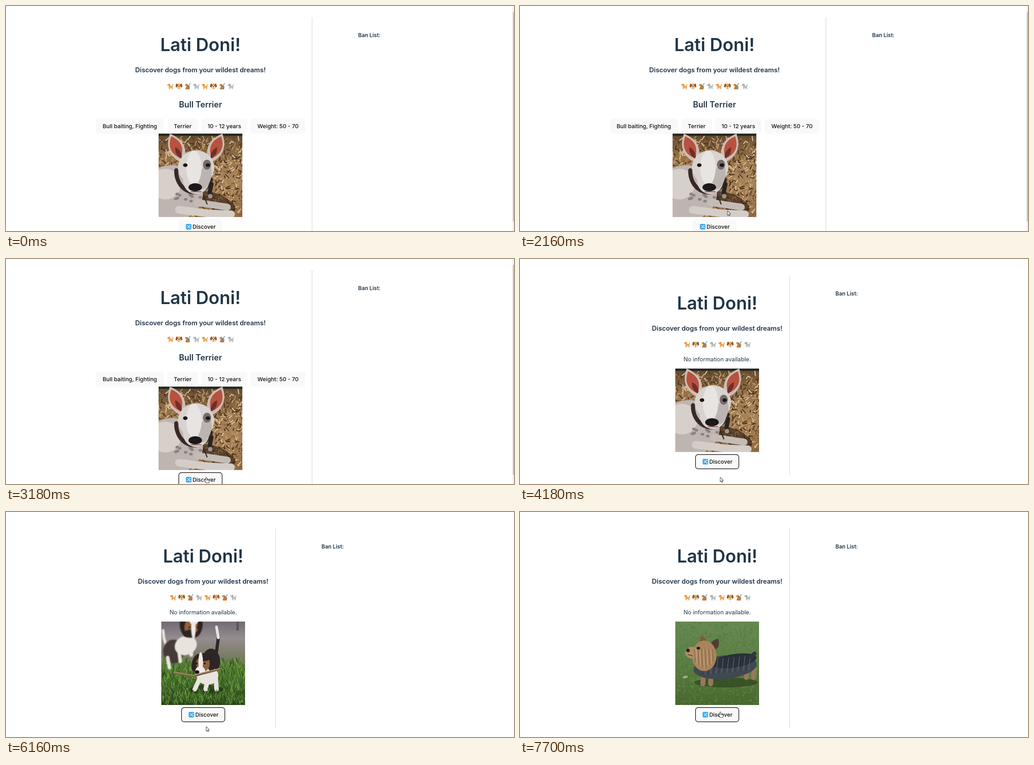
Animation of 1122 by 499 pixels, one loop 8 s. Source, as an HTML page with a canvas:

```html
<!DOCTYPE html>
<html lang="en">
<head>
<meta charset="utf-8">
<title>Dog finder</title>
<style>
  html, body { margin: 0; width: 100%; height: 100%; overflow: hidden; background: #fff; }
  canvas, .page { position: absolute; left: 0; top: 0; width: 1122px; height: 499px; overflow: hidden; }
  .page span {
    position: absolute; transform: translate(-50%, -50%); white-space: nowrap;
    line-height: 1.2; font-family: Inter, "Open Sans", sans-serif;
  }
</style>
</head>
<body>
<canvas id="art" width="1122" height="499"></canvas>
<div class="page" id="found"></div>
<div class="page" id="empty"></div>
<canvas id="pointer" width="1122" height="499"></canvas>
<script>
const LOOP = 8000, SWAP = 4180, SIZE = 185;
const INK = '#213547', BLACK = '#111';
const byId = id => document.getElementById(id);
const art = byId('art').getContext('2d');
const overlay = byId('pointer').getContext('2d');
const found = byId('found'), empty = byId('empty');

// ---------- text ----------
function label(page, str, x, y, size, weight, color = INK) {
  const s = document.createElement('span');
  s.textContent = str;
  s.style.cssText = `left:${x}px;top:${y}px;font-size:${size}px;font-weight:${weight};color:${color}`;
  page.append(s);
}
function shared(page, x, y, banX, buttonY) {
  label(page, 'Lati Doni!', x, y, 39.2, 600);
  label(page, 'Discover dogs from your wildest dreams!', x, y + 57, 14.55, 600);
  label(page, 'Ban List:', banX, y - 21.5, 11.9, 600);
  label(page, 'Discover', x + 8, buttonY, 12.2, 500, BLACK);
}
const pills = [
  { str: 'Bull baiting, Fighting', x: 198, w: 151 },
  { str: 'Terrier', x: 356.5, w: 67.5 },
  { str: '10 - 12 years', x: 431, w: 102.5 },
  { str: 'Weight: 50 - 70', x: 540.5, w: 120.5 }
];
shared(found, 429.5, 86, 802.5, 490);
label(found, 'Bull Terrier', 429.5, 219, 18, 600);
for (const p of pills) label(found, p.str, p.x + p.w / 2, 267, 12.35, 450, BLACK);
shared(empty, 435.5, 98, 721.5, 449.5);
label(empty, 'No information available.', 435.5, 222.5, 12.7, 400);

// ---------- drawing helpers ----------
function rng(seed) {
  return () => (seed = (seed * 16807) % 2147483647) / 2147483647;
}
function oval(c, fill, x, y, rx, ry = rx, turn = 0) {
  c.fillStyle = fill;
  c.beginPath();
  c.ellipse(x, y, rx, ry, turn, 0, 7);
  c.fill();
}
function line(c, color, width, ...p) {
  c.strokeStyle = color;
  c.lineWidth = width;
  c.lineCap = c.lineJoin = 'round';
  c.beginPath();
  for (let i = 0; i < p.length; i += 2) c.lineTo(p[i], p[i + 1]);
  c.stroke();
}
// pointed lens from one end to the other
function leaf(c, fill, x0, y0, x1, y1, fat) {
  const mx = (x0 + x1) / 2, my = (y0 + y1) / 2, k = fat / Math.hypot(x1 - x0, y1 - y0);
  const nx = (y0 - y1) * k, ny = (x1 - x0) * k;
  c.fillStyle = fill;
  c.beginPath();
  c.moveTo(x0, y0);
  c.quadraticCurveTo(mx + nx, my + ny, x1, y1);
  c.quadraticCurveTo(mx - nx, my - ny, x0, y0);
  c.fill();
}
function box(c, x, y, w, h, r, fill) {
  c.beginPath();
  c.roundRect(x, y, w, h, r);
  c.fillStyle = fill;
  c.fill();
}
function at(c, x, y, draw, sx = 1, sy = sx) {
  c.save();
  c.translate(x, y);
  c.scale(sx, sy);
  draw(c);
  c.restore();
}
function backdrop(c, ...colors) {
  const g = c.createLinearGradient(0, 0, 0, SIZE);
  colors.forEach((color, i) => g.addColorStop(i / (colors.length - 1), color));
  c.fillStyle = g;
  c.fillRect(0, 0, SIZE, SIZE);
}
function strokes(c, count, top, colors, length, width, lean) {
  const rand = rng(count);
  for (let i = 0; i < count; i++) {
    const x = rand() * SIZE, y = top + rand() * (SIZE - top);
    const a = -Math.PI / 2 + (rand() - .5) * lean, l = length * (.5 + rand());
    line(c, colors[i % colors.length], width, x, y, x + Math.cos(a) * l, y + Math.sin(a) * l);
  }
}
function picture(draw) {
  const cv = document.createElement('canvas');
  cv.width = cv.height = SIZE;
  draw(cv.getContext('2d'));
  return cv;
}
const sides = [-1, 1];

// ---------- pictures ----------
const terrier = picture(c => {
  backdrop(c, '#5d472f', '#8f6d45', '#a8845a', '#a17b50', '#8f6a43');
  strokes(c, 800, 12, ['#c9a477', '#e0c59c', '#84603a', '#543b25', '#b58d5f', '#493220'], 7, 2.2, 3.1);
  box(c, 0, 0, SIZE, 5, 0, '#252821');
  oval(c, 'rgba(45,28,18,.6)', 128, 152, 45, 18, .4);
  oval(c, '#beb5b0', 30, 132, 68, 62);
  oval(c, '#d6cfca', 15, 112, 34, 34);
  line(c, '#c4bbb5', 15, 85, 153, 152, 163);
  line(c, '#d4ccc7', 17, 45, 169, 110, 177, 160, 179);
  const rand = rng(12);
  for (let i = 0; i < 10; i++) oval(c, '#8b8382', 38 + rand() * 56, 132 + rand() * 22, 4, 3);
  c.lineWidth = 9;
  c.strokeStyle = '#372a24';
  c.beginPath();
  c.ellipse(79, 84, 40, 46, 0, .4, 3.2);
  c.stroke();
  for (const s of sides) {
    leaf(c, '#cdbdb5', 83 + s * 58, 0, 83 + s * 28, 66, 34);
    leaf(c, '#b8523f', 83 + s * 55, 6, 83 + s * 34, 55, 25);
    leaf(c, '#6f2f27', 83 + s * 46, 30, 83 + s * 32, 56, 10);
  }
  oval(c, '#d8d3d0', 83, 75, 40, 38);
  oval(c, '#d8d3d0', 83, 104, 29, 30);
  oval(c, '#bcb4b0', 103, 96, 13, 28, .25);
  oval(c, '#e8e4e1', 78, 76, 17, 38);
  oval(c, '#756c69', 107, 69, 9, 11);
  for (const s of sides) oval(c, '#1c1716', 84 + s * 25, 70, 5, 4);
  oval(c, '#1d191a', 81, 119, 15, 9);
  line(c, '#8a5752', 2, 72, 129, 94, 129);
  line(c, '#2b2321', 9, 117, 112, 113, 130);
  oval(c, '#9c9490', 114, 139, 5);
  line(c, '#3a302b', 2.5, 101, 140, 107, 156);
});

function puppyHead(c) {
  for (const s of sides) oval(c, '#2d2523', s * 15, -2, 9, 20, -s * .3);
  oval(c, '#94603d', 0, 0, 15, 18);
  oval(c, '#2d2523', 2, -14, 15, 9);
  oval(c, '#f0ebe7', -5, -3, 5, 22);
  oval(c, '#f0ebe7', -6, 18, 11, 12);
  oval(c, '#191617', -13, 19, 5, 4);
  for (const s of sides) oval(c, '#191617', -5 + s * 9, 0, 2);
}
const puppies = picture(c => {
  const coat = '#2c2626', white = '#e9e3de';
  backdrop(c, '#716a70', '#958c91', '#7d7d68', '#4e792d', '#3c602a', '#263f18');
  strokes(c, 900, 90, ['#608f35', '#3e6724', '#7da74a', '#284619', '#4b772a'], 10, 1.2, 1.1);
  box(c, 166, 0, 5, 20, 0, '#5c545b');
  c.filter = 'blur(1px)';
  line(c, white, 6, 4, 20, 6, 38, 12, 55);
  oval(c, '#453a37', 27, 66, 23, 26);
  oval(c, white, 54, 53, 25, 21, -.4);
  for (let i = 0; i < 3; i++) line(c, white, 8, 14 + i * 26, 80 - i * 8, 18 + i * 24, 102 - i * 14);
  at(c, 66, 13, puppyHead, -1);
  c.filter = 'none';
  oval(c, 'rgba(20,40,12,.55)', 98, 151, 38, 10);
  line(c, coat, 7, 122, 66, 126, 36);
  line(c, white, 6, 126, 36, 122, 12);
  oval(c, coat, 110, 88, 20, 28);
  oval(c, white, 102, 120, 24, 20);
  for (let i = 0; i < 3; i++) line(c, white, 10, 86 + i * 17, 124, 74 + i * 24, 150);
  at(c, 92, 93, puppyHead);
  line(c, '#7b6347', 5, 28, 113, 70, 121, 130, 105);
  line(c, '#b49b76', 1.5, 28, 112, 70, 119, 130, 104);
  strokes(c, 160, 158, ['#4c762b', '#31531f', '#6c9740'], 9, 1.2, 1.1);
});

const yorkie = picture(c => {
  backdrop(c, '#66894f', '#5f8249', '#547739', '#45672f');
  strokes(c, 900, 4, ['#70935a', '#557a40', '#4b7034', '#658950'], 5, 1, 3);
  oval(c, 'rgba(35,55,25,.55)', 112, 135, 70, 11);
  for (const x of [62, 79, 158, 174]) line(c, '#96785a', 11, x, 105, x - 1, x < 100 ? 138 : 124);
  oval(c, '#414851', 110, 101, 70, 26, -.1);
  oval(c, '#2a3038', 130, 87, 50, 15, -.15);
  for (let i = 0; i < 18; i++)
    line(c, i % 2 ? '#5b626b' : '#303740', 1.5, 64 + i * 6, 86 - i * .6, 60 + i * 6, 118 - i * .6);
  line(c, '#30363d', 9, 168, 78, 175, 71);
  leaf(c, '#7c5b40', 58, 30, 66, 62, 15);
  leaf(c, '#503d31', 95, 38, 78, 66, 18);
  oval(c, '#a8845d', 64, 76, 27, 34);
  oval(c, '#b08d65', 37, 69, 15, 13);
  for (let i = 0; i < 11; i++)
    line(c, i % 2 ? '#c2a47d' : '#866544', 1.4, 42 + i * 4, 62, 44 + i * 4, 104 - Math.abs(i - 5) * 3);
  oval(c, '#282321', 28, 64, 4);
  oval(c, '#211e1d', 51, 59, 4, 3);
  line(c, '#4b382c', 1.5, 28, 73, 38, 76);
  oval(c, '#b0a690', 22, 123, 6, 2.5, -.3);
});

// ---------- page parts ----------
const walker = (coat, trim) => c => {
  oval(c, coat, 1, 1, 4.8, 2.4);
  oval(c, coat, -4, -3, 3, 2.5);
  line(c, coat, 1.8, 5, 0, 6, -4);
  for (const s of sides) for (const x of [-1, 1]) line(c, coat, 1.5, 1 + s * 3 + x, 2, 1 + s * 3 + x, 6);
  line(c, trim, 1.5, -2, -5, -1, -2);
};
function face(c) {
  oval(c, '#e8ad5e', 0, 0, 6, 6.5);
  oval(c, '#f7e6c5', 0, 2.5, 3.7);
  for (const s of sides) {
    oval(c, '#985323', s * 5.5, -2, 2, 4.5, -s * .2);
    oval(c, '#40312d', s * 2.5, -1.5, 1);
  }
  oval(c, '#40312d', 0, 1, 1.7, 1.1);
  oval(c, '#e77472', 0, 5, 1.4);
}
function guide(c) {
  oval(c, '#cc8136', 1, 2, 4.5, 4);
  oval(c, '#d48d40', -3, -3, 3, 2.5);
  line(c, '#9f5828', 1.8, -1, -4, 0, -1);
  line(c, '#bd7230', 2, -3, 3, -4, 6, 4, 6);
  line(c, '#3c95ce', 1.5, 2, 4, 1, 0, 6, -7);
}
const icons = [walker('#efa54f', '#b76b2d'), face, guide, walker('#b8babd', '#77797e')];
function iconRow(x, y) {
  for (let i = 0; i < 8; i++) at(art, x + i * 19.05, y, icons[i % 4], .95);
}
function shuffle(c) {
  box(c, -6, -6, 12, 12, 1.8, '#2aa0e8');
  for (const s of sides) {
    line(c, '#fff', 1.2, -4, -2.5 * s, -2, -2.5 * s, 1.5, 2.5 * s, 4, 2.5 * s);
    line(c, '#fff', 1, 2.7, s, 4.2, 2.5 * s, 2.7, 4 * s);
  }
}
function button(x, y, border) {
  box(art, x, y, 97, 33, 6.5, '#f9f9f9');
  art.beginPath();
  art.roundRect(x + .6, y + .6, 95.8, 31.8, 6);
  art.strokeStyle = `rgba(0,0,0,${border})`;
  art.lineWidth = 1.2;
  art.stroke();
  at(art, x + 22.5, y + 16.5, shuffle);
}
const clamp = v => Math.max(0, Math.min(1, v));

function drawPage(t) {
  art.clearRect(0, 0, 1122, 499);
  if (t < SWAP) {
    box(art, 675.3, 25, 1.4, 474, 0, '#dcdee0');
    box(art, 1118.5, 0, 3.5, 499, 0, '#f1f1f1');
    box(art, 1119.5, 13, 2.5, 465, 0, '#c1c1c1');
    iconRow(363, 178);
    for (const p of pills) box(art, p.x, 250, p.w, 33, 6.5, '#f9f9f9');
    art.drawImage(terrier, 337, 283);
    button(381, 473, clamp((t - 2600) / 290));
  } else {
    box(art, 595, 37, 1, 443.5, 0, '#d5d7da');
    iconRow(369, 189.5);
    art.drawImage(t < 4580 ? terrier : t < 7700 ? puppies : yorkie, 343, 243);
    button(387, 433, 1);
  }
}

// ---------- pointer ----------
const STEP = 67.5;
const entry = { x: 1145, y: 540 };
const moves = [
  { start: 960, end: 1180, x: 811, y: 332 },
  { start: 1500, end: 1640, x: 529, y: 383 },
  { start: 1900, end: 2160, x: 458, y: 454 },
  { start: 2230, end: 2640, x: 442, y: 484 },
  { start: 6160, end: 6430, x: 442, y: 443 }
];
function pointerAt(t) {
  const i = moves.filter(m => t >= m.start).length - 1;
  if (i < 0) return null;
  const to = moves[i], from = moves[i - 1] || entry;
  const steps = Math.round((to.end - to.start) / STEP) + 1;
  const done = Math.floor((t - to.start + 6) / (to.end - to.start) * (steps - 1)) + 1;
  const k = Math.min(1, done / steps);
  return { x: from.x + (to.x - from.x) * k, y: from.y + (to.y - from.y) * k };
}
function outlined(c, path) {
  c.strokeStyle = '#222';
  c.lineWidth = 1.7;
  c.lineJoin = 'round';
  c.stroke(path);
  c.fillStyle = '#fff';
  c.fill(path);
}
function hand(c) {
  const p = new Path2D();
  p.roundRect(-.5, .5, 1.8, 9, .9);
  p.roundRect(-1, 5.5, 7.5, 6.5, 2);
  p.roundRect(-3.3, 6.8, 4, 2.2, 1);
  outlined(c, p);
  for (let x = 1.6; x < 6; x += 1.9) line(c, '#222', .6, x, 5.5, x, 7.5);
}
function arrow(c) {
  outlined(c, new Path2D('M.5.8V9.5L2.6 7.6L4.2 10.8L5.2 10.3L3.8 7.2H6.5Z'));
}
const pressed = t => [2980, 6690].some(start => t >= start && t < start + 200);

function drawPointer(t) {
  overlay.clearRect(0, 0, 1122, 499);
  const p = pointerAt(t);
  if (!p) return;
  if (pressed(t)) oval(overlay, 'rgba(255,255,0,.47)', p.x, p.y, 9);
  const over = p.x > 381 && p.x < 478 && (t < SWAP ? p.y > 473 : p.y < 465);
  at(overlay, p.x, p.y, over ? hand : arrow);
}

function frame() {
  const t = performance.now() % LOOP;
  found.hidden = t >= SWAP;
  empty.hidden = t < SWAP;
  drawPage(t);
  drawPointer(t);
  requestAnimationFrame(frame);
}
frame();
</script>
</body>
</html>
```
